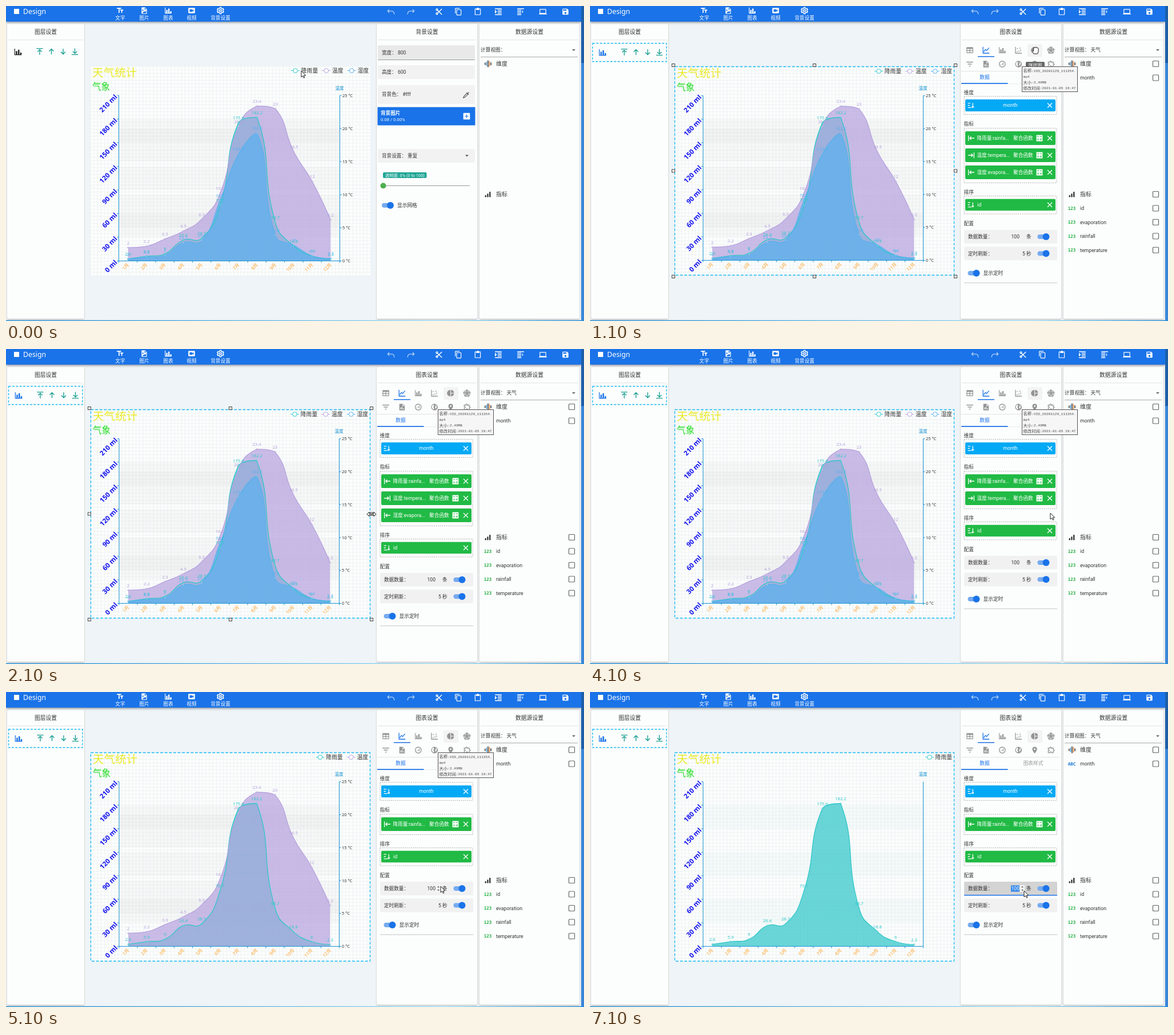
An HTML page with a canvas for the animation above (8000 ms loop, 1012 px wide and 553 px high).

```html
<!DOCTYPE html>
<html lang="zh-CN">
<head>
<meta charset="utf-8">
<title>Design</title>
<style>
html, body { margin: 0; width: 100%; height: 100%; overflow: hidden; background: #f4f6f7; }
canvas { display: block; }
</style>
</head>
<body>
<canvas id="stage" width="1012" height="553"></canvas>
<script>
const g = document.getElementById('stage').getContext('2d');
const CJK = '"Noto Sans CJK SC", "Noto Sans CJK", sans-serif';
const UI = 'Roboto, ' + CJK, PLOT = '"Noto Sans", ' + CJK;
const BLUE = '#1a73e8', GREEN = '#21ba45', TEAL = '#159e90', INK = '#333', GREY = '#949494';

// Icons on a 24 unit grid; F = filled, S = stroked
const F = {
  size: 'M2 4V7H7V19H10V7H15V4ZM21 9H12V12H15V19H18V12H21Z',
  image: 'M6 2H14L20 8V20A2 2 0 0 1 18 22H6A2 2 0 0 1 4 20V4A2 2 0 0 1 6 2M13 3.5V9H18.5ZM6 20H18V12L14 16L12 14ZM8 9A2 2 0 0 0 8 13A2 2 0 0 0 8 9Z',
  bars: 'M22 21H2V3H4V19H6V10H10V19H12V6H16V19H18V14H22Z',
  video: 'M18 16L14 12.8V16H6V8H14V11.2L18 8ZM20 4H4A2 2 0 0 0 2 6V18A2 2 0 0 0 4 20H20A2 2 0 0 0 22 18V6A2 2 0 0 0 20 4Z',
  copy: 'M19 21H8V7H19ZM19 5H8A2 2 0 0 0 6 7V21A2 2 0 0 0 8 23H19A2 2 0 0 0 21 21V7A2 2 0 0 0 19 5M16 1H4A2 2 0 0 0 2 3V17H4V3H16Z',
  paste: 'M19 20H5V4H7V7H17V4H19ZM19 2H14.8C14.4 .8 13.3 0 12 0S9.6 .8 9.2 2H5A2 2 0 0 0 3 4V20A2 2 0 0 0 5 22H19A2 2 0 0 0 21 20V4A2 2 0 0 0 19 2Z',
  laptop: 'M4 6H20V16H4ZM20 18A2 2 0 0 0 22 16V6A2 2 0 0 0 20 4H4A2 2 0 0 0 2 6V16A2 2 0 0 0 4 18H0V20H24V18Z',
  save: 'M15 9H5V5H15ZM12 19A3 3 0 0 1 12 13A3 3 0 0 1 12 19M17 3H5A2 2 0 0 0 3 5V19A2 2 0 0 0 5 21H19A2 2 0 0 0 21 19V7Z',
  table: 'M4 3H20A2 2 0 0 1 22 5V19A2 2 0 0 1 20 21H4A2 2 0 0 1 2 19V5A2 2 0 0 1 4 3M4 8V12H11V8ZM13 8V12H20V8ZM4 14V19H11V14ZM13 14V19H20V14Z',
  pie: 'M11 2V22A10 10 0 0 1 11 2M13 2V11H22A10 10 0 0 0 13 2M13 13V22A10 10 0 0 0 22 13Z',
  file: 'M6 2H14L20 8V22H4V2ZM13 3.5V9H18.5ZM7 19H9V13H7ZM11 19H13V11H11ZM15 19H17V15H15Z',
  globe: 'M12 2A10 10 0 0 0 12 22A10 10 0 0 0 12 2M6 6L10 5L11 9L8 12L11 15L10 19C6 18 4 14 4 11ZM15 5L19 8L18 14L15 17L14 12L16 9Z',
  pin: 'M12 2A7 7 0 0 0 5 9C5 14 12 22 12 22S19 14 19 9A7 7 0 0 0 12 2M12 6.5A2.5 2.5 0 0 1 12 11.5A2.5 2.5 0 0 1 12 6.5Z',
  calc: 'M2 2H22V22H2ZM4.5 6V8H10.5V6ZM13.5 6V8H19.5V6ZM4.5 15V17H10.5V15ZM6.5 13V19H8.5V13ZM13.5 14V15.5H19.5V14ZM13.5 17V18.5H19.5V17Z',
  plus: 'M4 2H20A2 2 0 0 1 22 4V20A2 2 0 0 1 20 22H4A2 2 0 0 1 2 20V4A2 2 0 0 1 4 2M11 7V11H7V13H11V17H13V13H17V11H13V7Z',
  signal: 'M3 15H7V21H3ZM10 10H14V21H10ZM17 4H21V21H17Z',
  caret: 'M6 9L12 15L18 9Z'
};
const S = {
  gear: 'M10 2.5H14L14.6 5.6L16.6 6.7L19.6 5.7L21.6 9.2L19.2 11.2V12.8L21.6 14.8L19.6 18.3L16.6 17.3L14.6 18.4L14 21.5H10L9.4 18.4L7.4 17.3L4.4 18.3L2.4 14.8L4.8 12.8V11.2L2.4 9.2L4.4 5.7L7.4 6.7L9.4 5.6ZM12 9A3 3 0 0 0 12 15A3 3 0 0 0 12 9',
  undo: 'M7 5L2 10L7 15M2 10H13C19 10 22 14 22 20',
  redo: 'M17 5L22 10L17 15M22 10H11C5 10 2 14 2 20',
  cut: 'M6 3.5A2.5 2.5 0 0 0 6 8.5A2.5 2.5 0 0 0 6 3.5M6 15.5A2.5 2.5 0 0 0 6 20.5A2.5 2.5 0 0 0 6 15.5M8 8L21 20.5M8 16L21 3.5',
  alignA: 'M2 3H22M10 7.5H22M10 12H22M10 16.5H22M2 21H22M3 9L6 12L3 15Z',
  alignB: 'M2 3H22M2 7.5H14M2 12H14M2 16.5H14M2 21H14M18 9V15',
  top: 'M2 2.5H22M12 22V6M5.5 12.5L12 6L18.5 12.5',
  up: 'M12 21V4M5 11L12 4L19 11',
  down: 'M12 3V20M5 13L12 20L19 13',
  bottom: 'M2 21.5H22M12 2V18M5.5 11.5L12 18L18.5 11.5',
  line: 'M3 2V21H22M5 17L10 10L14 13L21 5',
  scatter: 'M3 2V21H22M7 7H10M12 15H15M15 6H18M17 12H20M7 16H10',
  radar: 'M12 2L22 9.5L18 21H6L2 9.5ZM12 7L17 10.5L15 17H9L7 10.5ZM12 2V12L18 21M12 12L6 21M2 9.5L12 12L22 9.5',
  filter: 'M2 6H22M6 12H18M10 18H14',
  gauge: 'M12 3A9 9 0 0 0 12 21A9 9 0 0 0 12 3M12 14L16 8M7 14H9M15 14H17',
  puzzle: 'M4 6H9C8 2 14 2 13 6H19V11C23 10 23 16 19 15V20H14C15 16 9 16 10 20H4V15C8 16 8 10 4 11Z',
  close: 'M4 4L20 20M20 4L4 20',
  sort: 'M2 5H10M2 12H8M2 19H14M18 4V19M14.5 15.5L18 19L21.5 15.5',
  left: 'M3 3V21M22 12H7M12 7L7 12L12 17',
  right: 'M21 3V21M2 12H17M12 7L17 12L12 17',
  pick: 'M3 21L5 16L14 7L17 10L8 19ZM13 5L19 11M16 8L20 4'
};

function icon(name, x, y, size, color, lw = 2) {
  g.save();
  g.translate(x - size / 2, y - size / 2);
  g.scale(size / 24, size / 24);
  g.fillStyle = g.strokeStyle = color;
  g.lineWidth = lw;
  if (F[name]) g.fill(new Path2D(F[name]), 'evenodd');
  else g.stroke(new Path2D(S[name]));
  g.restore();
}
// y is the vertical middle of the glyphs
function text(s, x, y, size, color = INK, align = 'left', font = UI, weight = 400) {
  g.font = `${weight} ${size}px ${font}`;
  g.textAlign = align;
  g.fillStyle = color;
  g.fillText(s, x, y + size * 0.36);
}
function tilted(s, x, y, size, color, weight) {
  g.save();
  g.translate(x, y);
  g.rotate(-Math.PI / 4);
  text(s, 0, 0, size, color, 'right', PLOT, weight);
  g.restore();
}
function box(x, y, w, h, color, r = 0) {
  g.fillStyle = color;
  g.beginPath();
  g.roundRect(x, y, w, h, r);
  g.fill();
}
function frame(x, y, w, h, color, lw = 1, dash = []) {
  g.strokeStyle = color;
  g.lineWidth = lw;
  g.setLineDash(dash);
  g.strokeRect(x, y, w, h);
  g.setLineDash([]);
}
function seg(x1, y1, x2, y2, color, lw = 1) {
  g.strokeStyle = color;
  g.lineWidth = lw;
  g.beginPath();
  g.moveTo(x1, y1);
  g.lineTo(x2, y2);
  g.stroke();
}
function dot(x, y, r, fill, stroke) {
  g.beginPath();
  g.arc(x, y, r, 0, 7);
  g.fillStyle = fill;
  g.fill();
  if (stroke) { g.strokeStyle = stroke; g.lineWidth = 1; g.stroke(); }
}
function toggle(x, y) {
  box(x - 10.5, y - 4, 20, 8, '#76abef', 4);
  dot(x + 4.5, y, 6, BLUE);
}
function panel(x, w, title) {
  g.save();
  g.shadowColor = 'rgba(0,0,0,.28)';
  g.shadowBlur = 3;
  g.shadowOffsetY = 1;
  box(x, 31, w, 518, '#fcfdfd', 2);
  g.restore();
  text(title, x + w / 2, 45.5, 9.8, INK, 'center');
  seg(x + 2, 59.5, x + w - 2, 59.5, '#e2e2e2');
}

const SERIES = [
  { name: '降雨量', color: '#2ec7c9', max: 210, v: [2.6, 5.9, 9, 26.4, 28.7, 70.7, 175.6, 182.2, 48.7, 18.8, 6, 2.3] },
  { name: '温度', color: '#b6a2de', max: 25, v: [2, 2.2, 3.3, 4.5, 6.3, 10.2, 20.3, 23.4, 23, 16.5, 12, 6.2] },
  { name: '湿度', color: '#5ab1ef', max: 210, v: [2, 4.9, 7, 23.2, 25.6, 76.7, 135.6, 162.2, 32.6, 20, 6.4, 3.3] }
];

// Smooth curve whose handles stay inside the bounds of all points
function curve(pts) {
  const lim = [0, 1].map(k => pts.map(p => p[k])).map(a => [Math.min(...a), Math.max(...a)]);
  const path = new Path2D();
  let out = pts[0];
  path.moveTo(...out);
  for (let i = 1; i < pts.length; i++) {
    const p = pts[i], a = pts[i - 1], b = pts[i + 1];
    const la = Math.hypot(p[0] - a[0], p[1] - a[1]);
    const lb = b ? Math.hypot(b[0] - p[0], b[1] - p[1]) : 0;
    const handle = k => p.map((c, j) =>
      Math.min(Math.max(c + (b[j] - a[j]) * 0.5 * k / (la + lb), lim[j][0]), lim[j][1]));
    path.bezierCurveTo(...out, ...(b ? handle(-la) : p), ...p);
    if (b) out = handle(lb);
  }
  return path;
}

function chart(s) {
  const d = s.sel ? 1 : 0, L = 197.5 + d * 0.5, R = 584.5 - d, T = 157 + d * 0.5, B = 447.5 - d;
  const H = B - T, step = (R - L) / 12, AXIS = '#1593d2', dual = s.series > 1;
  box(148, 106, 490, 367, '#fcfdfd');
  for (let x = 148; x < 638; x += 6.125) seg(x, 106, x, 473, '#eaeff0', 0.7);
  for (let y = 106; y < 473; y += 6.125) seg(148, y, 638, y, '#eaeff0', 0.7);
  const bands = (n, c) => { for (let i = 1; i < n; i += 2) box(L, B - H * (i + 1) / n, R - L, H / n, c); };
  bands(7, dual ? 'rgba(200,200,195,.11)' : 'rgba(200,222,228,.14)');
  if (dual) bands(5, 'rgba(200,200,195,.11)');

  const shown = SERIES.slice(0, s.series).map(o => {
    const pts = o.v.map((v, i) => [L + step * (i + 0.5), B - v / o.max * H]);
    return { ...o, pts, path: curve(pts) };
  });
  for (const o of shown) {
    const area = new Path2D(o.path);
    area.lineTo(o.pts[11][0], B);
    area.lineTo(o.pts[0][0], B);
    g.globalAlpha = 0.7;
    g.fillStyle = o.color;
    g.fill(area);
    g.globalAlpha = 1;
  }
  seg(L, T, L, B, AXIS);
  seg(R, T, R, B, AXIS);
  seg(L, B, R, B, AXIS);
  for (let i = 0; i <= 7; i++) {
    const y = B - H * i / 7;
    seg(L - 3, y, L, y, AXIS);
    tilted(i * 30 + ' ml', L - 5, y + 0.5, 11.7, '#1515ee', 700);
  }
  for (let i = 0; i <= 12; i++) {
    seg(L + step * i, B, L + step * i, B + 3, AXIS);
    if (i < 12) tilted(i + 1 + '月', L + step * (i + 0.5), B + 5.5, 7.8, '#ff9d1e');
  }
  if (dual) for (let i = 0; i <= 5; i++) {
    const y = B - H * i / 5;
    seg(R, y, R + 3, y, AXIS);
    text(i * 5 + ' °C', R + 4.5, y, 7.4, INK, 'left', PLOT);
  }
  text('温度', R - 0.5, T - 13, 7.6, '#1593d2', 'center', PLOT, 500);
  for (const o of shown) {
    g.strokeStyle = o.color;
    g.lineWidth = 1.3;
    g.stroke(o.path);
  }
  for (const o of shown) o.pts.forEach(([x, y], i) => {
    dot(x, y, 1, '#fff', o.color);
    text(o.v[i], x, y - 8.5, 7.7, o.color, 'center', PLOT);
  });

  text('天气统计', 151 + d, 117 + d, 19.6, '#eaea28', 'left', PLOT);
  text('气象', 151 + d, 141 + d, 15.6, '#25dc25', 'left', PLOT);
  let x = 635 - d;
  for (const o of [...shown].reverse()) {
    x -= o.name.length * 9.8;
    const y = 113.5 + d;
    text(o.name, x, y, 9.8, INK, 'left', PLOT);
    seg(x - 17.5, y, x - 3, y, o.color);
    dot(x - 10.2, y, 3.8, '#fff', o.color);
    x -= 24.8;
  }
  if (s.sel) frame(148.5, 106.5, 489, 366, '#17b9f3', 1.3, [5, 2.6]);
  if (s.handles) for (const hx of [146, 393, 640]) for (const hy of [104, 289.5, 475]) {
    if (hx === 393 && hy === 289.5) continue;
    box(hx - 3, hy - 3, 6, 6, '#fff');
    frame(hx - 2.5, hy - 2.5, 5, 5, '#444');
  }
}

function header() {
  g.save();
  g.shadowColor = 'rgba(0,0,0,.4)';
  g.shadowBlur = 4;
  g.shadowOffsetY = 1;
  box(0, 0, 1007, 27.5, BLUE);
  g.restore();
  box(14, 5, 9, 9, '#fff');
  text('Design', 30, 9.5, 12.3, '#fff', 'left', PLOT);
  [['size', 200, '文字'], ['image', 242, '图片'], ['bars', 284, '图表'], ['video', 325, '视频'], ['gear', 375.5, '背景设置']]
    .forEach(([n, x, s]) => {
      icon(n, x, 8, 14, '#fff', 2.6);
      text(s, x, 21, 8.7, '#fff', 'center');
    });
  icon('undo', 674, 10, 14, 'rgba(255,255,255,.7)');
  icon('redo', 709, 10, 14, 'rgba(255,255,255,.7)');
  [['cut', 758], ['copy', 792], ['paste', 826], ['alignA', 862], ['alignB', 901], ['laptop', 940], ['save', 979.5]]
    .forEach(([n, x]) => icon(n, x, 10, 14, '#fff', 2.4));
}

function layers(s) {
  panel(2, 135, '图层设置');
  const d = s.sel ? 1 : 0;
  if (d) frame(4.5, 65.5, 129.5, 32, '#17b9f3', 1.3, [4, 2.4]);
  icon('bars', 21 + d, 80.5 + d, 15, d ? BLUE : '#222');
  ['top', 'up', 'down', 'bottom'].forEach((n, i) => icon(n, 59 + 20.5 * i + d, 80 + d, 13.5, TEAL, 2.4));
}

function backdrop() {
  panel(649, 176, '背景设置');
  box(651, 69, 170, 25, '#e9e9e9', 2);
  seg(651, 94.5, 821, 94.5, '#999');
  for (const [y, h] of [[104, 24], [139, 33], [251, 24]]) box(651, y, 170, h, '#f2f2f2', 2);
  text('宽度： 800', 658, 81.5, 8.6);
  text('高度： 600', 658, 116, 8.6);
  text('背景色： #fff', 658, 155, 8.6);
  icon('pick', 806, 156, 14, '#555');
  box(650.5, 177.5, 171, 32, BLUE);
  text('背景图片', 656, 187.5, 8.6, '#fff', 'left', UI, 700);
  text('0.08 / 0.00%', 656, 199, 7.7, '#fff');
  icon('plus', 806.5, 193.5, 14, '#fff');
  text('背景设置： 重复', 658, 263, 8.6);
  icon('caret', 807, 263, 12, '#555');
  box(660, 292, 76.5, 10, '#1fa595', 2);
  text('透明度: 0% (0 to 100)', 698.3, 297, 7.4, '#fff', 'center');
  seg(660, 315.5, 812, 315.5, '#999');
  dot(660.5, 315.5, 5, '#4caf50');
  toggle(668.5, 350);
  text('显示网格', 685, 350, 8.7);
}

function chip(y, h, color) {
  box(657, y - h / 2, 158, h, color, 2);
  icon('close', 805, y, 12, '#fff', 2.6);
}

function settings(s) {
  panel(649, 176, '图表设置');
  box(766, 67, 26, 22, '#f3f3f3', 2);
  [['table', 'filter'], ['line', 'file'], ['bars', 'gauge'], ['scatter', 'globe'], ['pie', 'pin'], ['radar', 'puzzle']]
    .forEach(([a, b], i) => {
      const x = 665 + 28.4 * i;
      icon(a, x, 77.5, 14, i === 1 ? BLUE : GREY, 2.2);
      icon(b, x, 102, 14, GREY, 2.2);
    });
  box(679, 88, 29, 1.5, BLUE);
  seg(650, 114.5, 823, 114.5, '#e3e3e3');
  text('数据', 691, 125, 8.7, BLUE, 'center');
  text('图表样式', 776, 125, 8.7, '#999', 'center');
  seg(650, 136.5, 823, 136.5, '#ebebeb');
  box(650, 135, 81.5, 1.7, BLUE);

  const dash = [2, 1.6];
  text('维度', 654.5, 151.5, 8.7);
  frame(655, 158.5, 162, 32, '#aaa', 0.9, dash);
  chip(174.5, 21, '#03a9f4');
  icon('sort', 667, 174.5, 13, '#fff', 2.4);
  text('month', 736, 174, 8.8, '#fff', 'center');

  text('指标', 654.5, 207, 8.7);
  frame(655, 214.5, 162, 6 + 30 * s.chips, '#aaa', 0.9, dash);
  ['降雨量:rainfa...', '温度:tempera...', '湿度:evapora...'].slice(0, s.chips).forEach((label, i) => {
    const y = 232 + 30 * i;
    chip(y, 24, GREEN);
    icon(i === 1 ? 'right' : 'left', 667.5, y, 13, '#fff', 2.4);
    text(label, 677.5, y, 8.6, '#fff');
    text('聚合函数', 741, y, 8.7, '#fff');
    icon('calc', 787, y, 13, '#fff');
  });

  const o = 30 * (s.chips - 3);
  text('排序', 654.5, 326.5 + o, 8.7);
  frame(655, 333.5 + o, 162, 31.5, '#aaa', 0.9, dash);
  chip(349 + o, 20.5, GREEN);
  icon('sort', 667, 349 + o, 13, '#fff', 2.4);
  text('id', 678, 349 + o, 8.8, '#fff');

  text('配置', 654.5, 381.5 + o, 8.7);
  box(655, 393 + o, 163, 24, s.focus ? '#d3d3d3' : '#f1f1f2', 2);
  box(655, 422.5 + o, 163, 24, '#f1f1f2', 2);
  if (s.focus) {
    box(655, 416 + o, 163, 1.6, BLUE);
    box(737, 399.5 + o, 15, 11, '#2f86ea');
  }
  text('数据数量：', 662, 405 + o, 8.6);
  text('100', 752, 405 + o, 8.6, s.focus ? '#fff' : INK, 'right');
  text('条', 764, 405 + o, 8.6);
  if (s.spin) {
    box(753, 399 + o, 8, 12, '#f4f4f4');
    icon('caret', 757, 408 + o, 8, '#444');
    g.save();
    g.translate(757, 402 + o);
    g.scale(1, -1);
    icon('caret', 0, 0, 8, '#444');
    g.restore();
  }
  toggle(794, 405 + o);
  text('定时刷新：', 662, 434.5 + o, 8.6);
  text('5 秒', 772.5, 434.5 + o, 8.6, INK, 'right');
  toggle(794, 434.5 + o);
  toggle(672, 469 + o);
  text('显示定时', 688.5, 469 + o, 8.7);
  seg(655, 486 + o, 818, 486 + o, '#c4c4c4');
}

function source(s) {
  panel(829, 175, '数据源设置');
  text('计算视图：' + (s.sel ? ' 天气' : ''), 831, 76.5, 8.7);
  icon('caret', 994, 77.5, 12, '#666');
  seg(831, 89.5, 1001, 89.5, '#aaa');
  [2, 5, 10, 7, 3].forEach((h, i) => box(838 + i * 2.6, 101.5 - h / 2 - 1, 1.5, h + 2, ['#444', '#2b8fd6', '#333', '#e07b2c', '#444'][i]));
  text('维度', 858, 101.5, 9.9);
  icon('signal', 843.5, 330.5, 13, '#222');
  text('指标', 858, 330.5, 9.9);
  if (!s.sel) return;
  const rows = [['month', 126], ['id', 355], ['evaporation', 379.5], ['rainfall', 404], ['temperature', 428.5]];
  rows.forEach(([name, y], i) => {
    text(i ? '123' : 'ABC', 843.5, y, 7.6, i ? '#1fae3c' : '#1976d2', 'center', '"DejaVu Sans Mono", monospace', 700);
    text(name, 858, y, 8.8);
  });
  for (const y of [101.5, 330.5, ...rows.map(r => r[1])]) {
    g.beginPath();
    g.roundRect(985.5, y - 5, 10, 10, 1);
    g.strokeStyle = '#666';
    g.lineWidth = 1.2;
    g.stroke();
  }
}

function fileTip() {
  box(756, 106, 98, 45, '#f6f6f6');
  frame(756.5, 106.5, 97, 44, '#555');
  [['名称', ':VID_20201129_111354.'], ['', 'mp4'], ['大小', ':2.49MB'], ['修改时间', ':2021-01-05 19:47']].forEach(([a, b], i) => {
    const y = 113.5 + 10.2 * i;
    text(a, 758.5, y, 7.35, '#444', 'left', CJK);
    text(b, 758.5 + a.length * 7.35, y, 6.15, '#444', 'left', '"Liberation Mono", monospace');
  });
}

const POINTERS = {
  arrow: 'M0 0V11L2.6 8.6L4.4 12.4L6 11.6L4.3 8H7.8Z',
  hand: 'M-3 6L-6 1.5C-6 0 -4.5 0 -3.5 1.5V-4C-3.5 -5.5 -1.5 -5.5 -1.5 -4C-1.5 -6.5 .8 -6.5 .8 -4.5C.8 -6 3 -6 3 -4C3 -5 5 -5 5 -3V2L3.5 6Z',
  resize: 'M-8 0L-4 -4V-1H4V-4L8 0L4 4V1H-4V4Z'
};
function pointer([kind, x, y]) {
  const p = new Path2D(POINTERS[kind]);
  g.save();
  g.translate(x, y);
  g.fillStyle = '#fff';
  g.strokeStyle = '#222';
  g.lineWidth = 1;
  g.fill(p);
  g.stroke(p);
  g.restore();
}

// Desktop showing past the window's right and lower edges
function desktop() {
  box(1007, 0, 5, 100, '#1d5fa8');
  box(1007, 100, 5, 453, '#3b86d8');
  const glow = g.createLinearGradient(0, 0, 1012, 0);
  glow.addColorStop(0, '#2a8fd4');
  glow.addColorStop(0.76, '#a5def2');
  glow.addColorStop(1, '#2a8fd4');
  box(0, 551.5, 1012, 1.5, glow);
}

const base = { sel: true, series: 3, chips: 3, tip: true };
const SCENES = [
  { at: 0, series: 3, cur: ['arrow', 517, 114] },
  { ...base, at: 100, handles: true, tip: false, cur: ['arrow', 517, 114] },
  { ...base, at: 1100, handles: true, hint: true, cur: ['hand', 780, 78] },
  { ...base, at: 2100, handles: true, cur: ['resize', 640, 290] },
  { ...base, at: 3100, handles: true, cur: ['arrow', 666, 302] },
  { ...base, at: 4100, chips: 2, cur: ['arrow', 806, 288] },
  { ...base, at: 5100, series: 2, chips: 1, spin: true, cur: ['arrow', 761, 341] },
  { ...base, at: 6100, series: 1, chips: 1, spin: true, tip: false, cur: ['arrow', 761, 341] },
  { ...base, at: 7100, series: 1, chips: 1, spin: true, focus: true, tip: false, cur: ['arrow', 760, 349] }
];

function draw(s) {
  box(0, 0, 1012, 553, '#f4f6f7');
  box(140, 28, 506, 522, '#eef4f7');
  layers(s);
  chart(s);
  if (s.sel) settings(s); else backdrop();
  source(s);
  header();
  desktop();
  if (s.hint) {
    box(763, 98, 33, 14, '#666', 2);
    text('饼状图', 779.5, 104, 8, '#fff', 'center');
  }
  if (s.tip) fileTip();
  pointer(s.cur);
}

let last;
function tick(now) {
  const t = now % 8000;
  const scene = SCENES.findLast(s => s.at <= t);
  if (scene !== last) draw(last = scene);
  requestAnimationFrame(tick);
}
draw(last = SCENES[0]);
requestAnimationFrame(tick);
</script>
</body>
</html>
```
